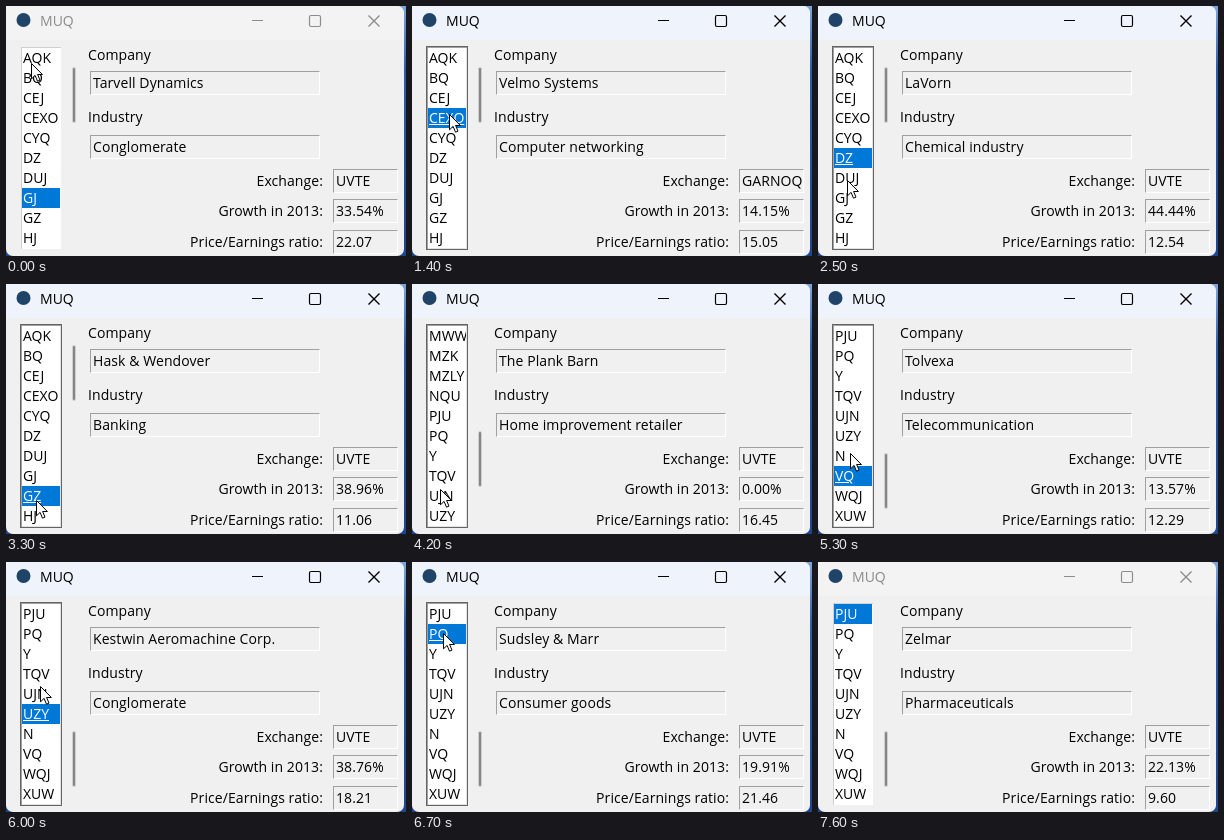
These frames come from a looping animation (400x250 px, 7.7 s). An HTML page:

```html
<!DOCTYPE html>
<html lang="en">
<head>
<meta charset="utf-8">
<title>MUQ</title>
<style>
  html, body { margin: 0; width: 100%; height: 100%; overflow: hidden; }
  body { position: relative; background: linear-gradient(#7fa6dc, #2b5fae 25%, #1c4690); }
  body, #win { font: 14px/20px "Open Sans", "Noto Sans", sans-serif; color: #000; }
  div, span, svg { position: absolute; box-sizing: border-box; white-space: pre; }
  #win { left: 0; top: 0; width: 398px; height: 250px; overflow: hidden;
         background: #f0f0f0; border-radius: 0 7px 7px 7px; }
  #bar { left: 0; top: 0; width: 398px; height: 34px; background: #f3f3f3; color: #8c8c8c; }
  #bar span { left: 34px; top: 5px; }
  #bar svg { left: 0; top: 0; fill: none; stroke: currentColor; }
  .active #bar { background: #eff3fb; color: #000; }

  #list { left: 14px; top: 40px; width: 42px; height: 204px; border: 1px solid #f0f0f0;
          background: #fff; box-shadow: inset 1px 1px #d0d0d0; }
  .active #list { border-color: #646464; box-shadow: inset 1px 1px #a0a0a0, inset -1px -1px #e3e3e3; }
  #view { left: 1px; top: 1px; width: 38px; height: 200px; overflow: hidden; }
  #rows { left: 0; top: 0; width: 38px; }
  #rows div { left: 0; width: 38px; height: 20px; padding-left: 1px; overflow: hidden; }
  #rows .sel { background: #0078d7; color: #fff; }
  .active #rows .sel { text-decoration: underline; }
  #thumb { left: 67px; top: 62px; width: 2px; height: 54px; border-radius: 1px;
           background: #868686; box-shadow: 0 0 0 1px #86868650; }

  .label, .field { letter-spacing: .08px; }
  .label.right { right: 81px; }
  .field { height: 24px; padding: 1px 0 0 2px; overflow: hidden; border: 1px solid;
           border-color: #a0a0a0 #fff #fff #a0a0a0; }
  #cursor { left: 0; top: 0; overflow: visible; }
</style>
</head>
<body>
<div id="win">
  <div id="bar">
    <svg width="398" height="34">
      <circle cx="17.5" cy="14" r="7" fill="#1f4468" stroke="none"/>
      <path d="M246 14.5h11"/>
      <rect x="303.5" y="9.5" width="11" height="11" rx="1.5" stroke-width="1.2"/>
      <path d="M362.5 9.5l11 11m0-11l-11 11" stroke-width="1.4"/>
    </svg>
    <span>MUQ</span>
  </div>
  <div id="list"><div id="view"><div id="rows"></div></div></div>
  <div id="thumb"></div>
</div>
<svg id="cursor" width="13" height="20">
  <path d="M.5 .5V15.8L4.1 12.4L6.5 18.2L9 17.1L6.6 11.5H11.4Z" fill="#fff" stroke="#000"/>
</svg>
<script>
const LOOP = 7700, TICK = 100, ROW = 20;
const $ = id => document.getElementById(id);
const win = $("win");

const symbols = ("AQK BQ CEJ CEXO CYQ DZ DUJ GJ GZ HJ IQW IZUK JQJ JUW KQ MJQ MWW MZK MZLY NQU " +
  "PJU PQ Y TQV UJN UZY N VQ WQJ XUW").split(" ");

// company, industry, exchange, growth, ratio
const facts = {
  AQK: ["Corvane Lending", "Consumer finance", "UVTE", "57.65%", "19.13"],
  BQ: ["Skelmar", "Aerospace and defense", "UVTE", "80.99%", "22.46"],
  CEJ: ["Dromund", "Construction equipment", "UVTE", "1.34%", "16.79"],
  CEXO: ["Velmo Systems", "Computer networking", "GARNOQ", "14.15%", "15.05"],
  CYQ: ["Petravo", "Oil & gas", "UVTE", "15.51%", "10.83"],
  DZ: ["LaVorn", "Chemical industry", "UVTE", "44.44%", "12.54"],
  DUJ: ["Tumbelo Pictures", "Entertainment", "UVTE", "53.44%", "21.69"],
  GJ: ["Tarvell Dynamics", "Conglomerate", "UVTE", "33.54%", "22.07"],
  GZ: ["Hask & Wendover", "Banking", "UVTE", "38.96%", "11.06"],
  HJ: ["The Plank Barn", "Home improvement retailer", "UVTE", "0.00%", "16.45"],
  XUW: ["Oxlander", "Oil & gas", "UVTE", "16.93%", "12.91"],
  WQJ: ["Bramvelt", "Retail", "UVTE", "15.33%", "14.68"],
  VQ: ["Tolvexa", "Telecommunication", "UVTE", "13.57%", "12.29"],
  N: ["Nuvo Cards", "Consumer banking", "UVTE", "46.91%", "28.35"],
  UZY: ["Kestwin Aeromachine Corp.", "Conglomerate", "UVTE", "38.76%", "18.21"],
  UJN: ["Hollisane Group", "Managed health care", "UVTE", "38.82%", "13.92"],
  TQV: ["Wayfellow", "Insurance", "UVTE", "26.06%", "9.23"],
  Y: ["Yondercall", "Telecommunication", "UVTE", "4.30%", "10.48"],
  PQ: ["Sudsley & Marr", "Consumer goods", "UVTE", "19.91%", "21.46"],
  PJU: ["Zelmar", "Pharmaceuticals", "UVTE", "22.13%", "9.60"]
};

// time, value: each holds until the next
const picks = [[0, "GJ"], [600, "AQK"], [900, "BQ"], [1200, "CEJ"], [1400, "CEXO"], [1800, "CYQ"],
  [2200, "DZ"], [2600, "DUJ"], [2900, "GJ"], [3200, "GZ"], [3600, "HJ"], [4600, "XUW"],
  [4800, "WQJ"], [5100, "VQ"], [5400, "N"], [5700, "UZY"], [6100, "UJN"], [6300, "TQV"],
  [6500, "Y"], [6700, "PQ"], [7000, "PJU"]];
const scrolls = [[0, 0], [3900, 4], [4000, 8], [4100, 12], [4200, 16], [4400, 20]];
const focus = [[0, false], [600, true], [7500, false]];

// time, x, y of the pointer tip
const path = [[0, 25, 57], [200, 25, 57], [400, 29, 56], [600, 29, 56], [900, 31, 72], [1200, 35, 92],
  [1400, 37, 108], [1800, 34, 128], [2200, 31, 150], [2500, 29, 174], [2900, 30, 190], [3200, 30, 211],
  [3600, 29, 230], [3900, 28, 205], [4400, 28, 205], [4600, 29, 231], [4800, 30, 212], [5100, 31, 191],
  [5300, 32, 169], [5400, 32, 168], [5700, 33, 149], [6000, 34, 124], [6100, 34, 124], [6300, 33, 108],
  [6500, 32, 90], [6700, 31, 71], [7000, 30, 52], [7200, 30, 52], [7400, 4, 80]];

function add(parent, cls, text, style) {
  const el = document.createElement("div");
  el.className = cls;
  el.textContent = text;
  Object.assign(el.style, style);
  parent.append(el);
  return el;
}
const px = n => n + "px";
const field = (x, y, w) => add(win, "field", "", { left: px(x), top: px(y), width: px(w) });

const rows = symbols.map((s, i) => add($("rows"), "", s, { top: px(i * ROW) }));
add(win, "label", "Company", { left: "82px", top: "39px" });
add(win, "label", "Industry", { left: "82px", top: "101px" });
const fields = [field(84, 65, 230), field(84, 129, 230)];
[["Exchange:", 163], ["Growth in 2013:", 193], ["Price/Earnings ratio:", 224]].forEach(([text, y]) => {
  add(win, "label right", text, { top: px(y + 2) });
  fields.push(field(327, y, 65));
});

const held = (keys, t) => keys.findLast(k => k[0] <= t)[1];

function tipAt(t) {
  const i = path.findIndex(k => k[0] > t);
  if (i < 0) return path.at(-1).slice(1);
  const [t0, x0, y0] = path[i - 1], [t1, x1, y1] = path[i];
  const p = (t - t0) / (t1 - t0);
  return [x0 + (x1 - x0) * p, y0 + (y1 - y0) * p];
}

function draw(t) {
  const pick = held(picks, t), top = held(scrolls, t);
  win.classList.toggle("active", held(focus, t));
  rows.forEach((row, i) => row.classList.toggle("sel", symbols[i] === pick));
  fields.forEach((el, i) => { el.textContent = facts[pick][i]; });
  $("rows").style.top = px(-top * ROW);
  $("thumb").style.top = px(62 + Math.round(top * 5.4));
  const [x, y] = tipAt(t).map(Math.round);
  $("cursor").style.transform = `translate(${x}px, ${y}px)`;
  $("cursor").style.visibility = t < 7500 ? "visible" : "hidden";
}

const start = performance.now();
let last = -1;
function loop() {
  const t = Math.floor((performance.now() - start) % LOOP / TICK) * TICK;
  if (t !== last) draw(last = t);
  requestAnimationFrame(loop);
}
loop();
</script>
</body>
</html>
```
